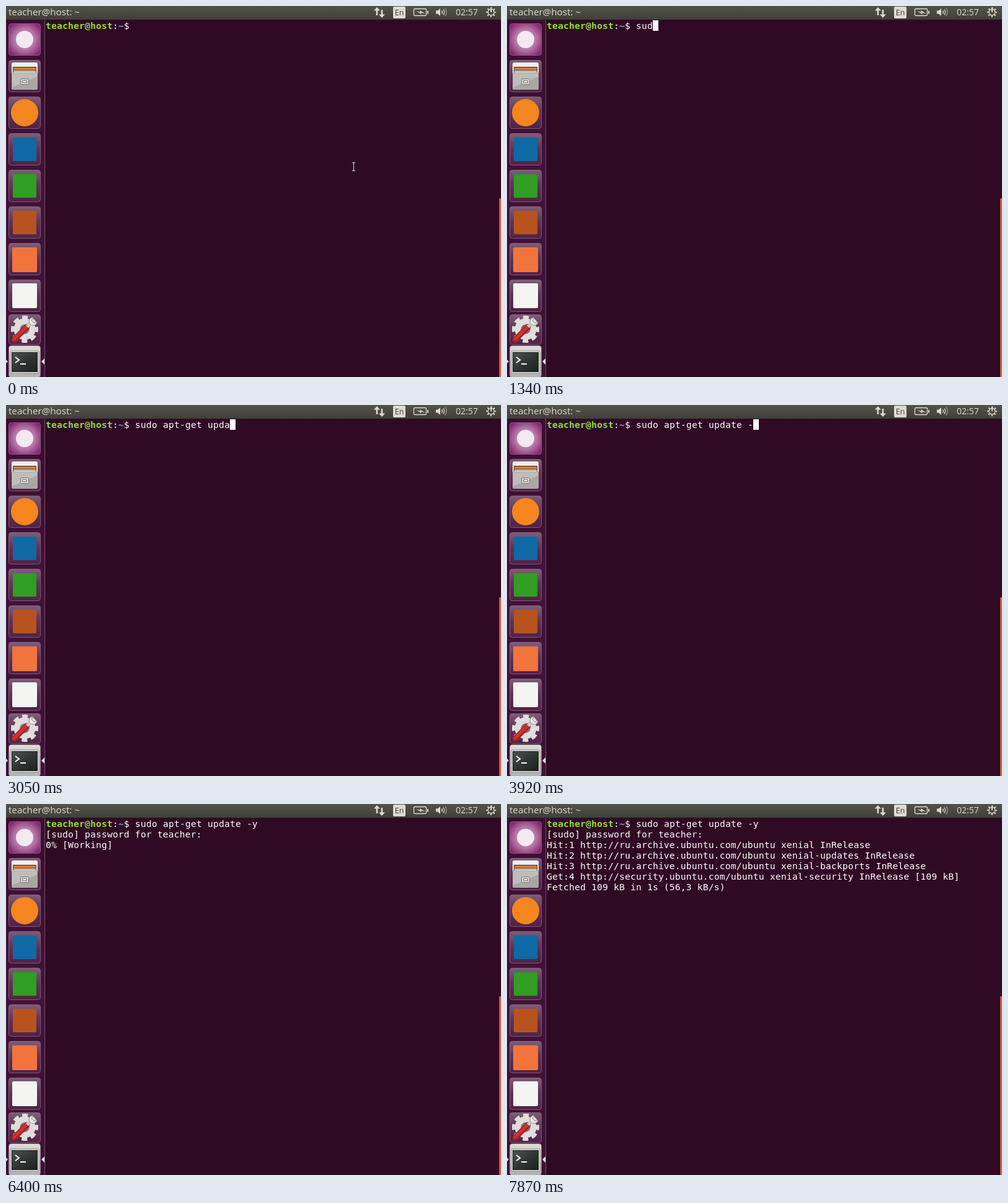
An HTML page that plays this animation: 798 px wide and 598 px high, repeating every 8 s.

```html
<!DOCTYPE html>
<html lang="en">
<head>
<meta charset="utf-8">
<title>Terminal</title>
<style>
  html, body { margin: 0; width: 100%; height: 100%; overflow: hidden; background: #300a24; }
  svg { display: block; width: 100%; height: 100%; }
  text { white-space: pre; }
  .term text { font: 14.667px "DejaVu Sans Mono", monospace; letter-spacing: .17px; fill: #fff; }
  .term .b { font-weight: bold; }
  .bar { font: 500 15.2px "Open Sans", "Noto Sans", sans-serif; fill: #dfdbd2; }
</style>
</head>
<body>
<svg viewBox="0 0 798 598">
  <defs>
    <linearGradient id="panel" x2="0" y2="1">
      <stop stop-color="#53524a"/><stop offset="1" stop-color="#403f3a"/>
    </linearGradient>
    <linearGradient id="dock" x2="0" y2="1">
      <stop stop-color="#3b0d31"/><stop offset=".5" stop-color="#43123a"/><stop offset="1" stop-color="#3f1036"/>
    </linearGradient>
    <linearGradient id="tile" x2="0" y2="1">
      <stop stop-color="#7f5d77"/><stop offset=".45" stop-color="#5e3655"/><stop offset="1" stop-color="#502247"/>
    </linearGradient>
    <radialGradient id="dash" r=".62">
      <stop stop-color="#d3a8c8"/><stop offset=".55" stop-color="#b474a4"/><stop offset="1" stop-color="#84256f"/>
    </radialGradient>
    <linearGradient id="active" x2="0" y2="1">
      <stop stop-color="#dddcd9"/><stop offset="1" stop-color="#b3b1ad"/>
    </linearGradient>
    <linearGradient id="screen" x2="1" y2="1">
      <stop stop-color="#50544f"/><stop offset=".5" stop-color="#313534"/><stop offset="1" stop-color="#1d2020"/>
    </linearGradient>
  </defs>

  <rect width="798" height="598" fill="#300a24"/>
  <rect x="795" y="310" width="3" height="288" fill="#cc5f49"/>

  <rect y="22" width="62" height="576" fill="url(#dock)"/>
  <path d="M62.5 22V598" stroke="#755069"/>
  <g id="tiles"></g>

  <!-- file cabinet -->
  <rect x="9" y="91" width="42" height="20" rx="3" fill="#efeeec"/>
  <path d="M11 98H49V108H11Z" fill="#5c3d28"/>
  <path d="M12 99.500H48V102H12Z" fill="#f3873a"/>
  <path d="M12 103H48V104H12Z" fill="#f6d9b5"/>
  <path d="M12 105H48V108H12Z" fill="#e4e2de"/>
  <rect x="9" y="107" width="42" height="28" rx="2" fill="#a9a7a3"/>
  <path d="M10 108H50V114L10 131Z" fill="#bfbdb9"/>
  <rect x="23.500" y="117.500" width="13" height="9" rx="2" fill="#d8d7d4" stroke="#77756f"/>
  <rect x="26.500" y="120.500" width="7" height="3" fill="#eee" stroke="#77756f"/>

  <!-- settings -->
  <circle cx="30" cy="521" r="19" fill="none" stroke="#dededc" stroke-width="6" stroke-dasharray="9 5.923" stroke-dashoffset="4.500"/>
  <circle cx="30" cy="521" r="12.500" fill="none" stroke="#dededc" stroke-width="10"/>
  <circle cx="30" cy="521" r="7.500" fill="#886880"/>
  <path d="M13 538L34 517" stroke="#a61f1f" stroke-width="9" stroke-linecap="round"/>
  <path d="M13 537L33 517" stroke="#d0332f" stroke-width="5" stroke-linecap="round"/>
  <path d="M34 517L41 510" stroke="#c9c9c7" stroke-width="6"/>
  <path d="M44 502A6.500 6.500 0 1 0 50 509L45 511L41 507Z" fill="#e9e9e7" stroke="#8c8a88"/>

  <!-- terminal launcher -->
  <rect x="7" y="556" width="46" height="36" rx="2" fill="#e6e5e2" stroke="#8a8884"/>
  <rect x="9.500" y="558.500" width="41" height="31" fill="url(#screen)" stroke="#181b1c"/>
  <path d="M15 566L21 570.500L15 575M23 577H32" fill="none" stroke="#fff" stroke-width="2"/>
  <path d="M62 568V578L57 573ZM0 570V576L3 573Z" fill="#e8e2e6"/>

  <!-- panel -->
  <rect width="798" height="22" fill="url(#panel)"/>
  <text class="bar" x="4" y="15">teacher@host: ~</text>
  <g fill="#dfdbd2">
    <path d="M598 2L603 7.500H599.300V15H596.700V7.500H593ZM606 19L601 13.500H604.700V6H607.300V13.500H611Z"/>
    <rect x="624" y="1" width="20" height="19" rx="2"/>
    <path d="M693 7.500H696L700 4V16L696 12.500H693Z"/>
    <path d="M661 8L668 10L667 7L676 12.500L669 10.700L670 13.500Z"/>
  </g>
  <text class="bar" x="634" y="15" text-anchor="middle" style="font-size:12.5px;fill:#3c3b37">En</text>
  <g fill="none" stroke="#dfdbd2" stroke-width="1.300">
    <rect x="657.500" y="4.500" width="20" height="11" rx="1.500"/>
    <path d="M680 8V12.500" stroke-width="2"/>
    <path d="M702.500 7.500Q704.500 10 702.500 12.500M705 5.500Q708 10 705 14.500"/>
    <path d="M708 3.500Q712 10 708 16.500" stroke-opacity=".55"/>
    <circle cx="782" cy="10" r="5"/>
    <circle cx="782" cy="10" r="6.700" stroke-width="2.600" stroke-dasharray="2 3.262" stroke-dashoffset="1"/>
    <path d="M782 4V10" stroke-width="2"/>
  </g>
  <text class="bar" x="725" y="15" style="font-size:14px">02:57</text>

  <g class="term">
    <text class="b" x="64" y="37" style="fill:#8ae234">teacher@host</text>
    <text x="172" y="37">:</text>
    <text class="b" x="181" y="37" style="fill:#729fcf">~</text>
    <text x="190" y="37">$</text>
    <g id="rows"></g>
    <rect id="caret" width="9" height="17" fill="#fff"/>
  </g>
  <path id="mouse" d="M-2.500 -6.500H2.500M0 -6.500V6.500M-2.500 6.500H2.500" fill="none" stroke="#e4e0e3"/>
</svg>
<script>
const $ = id => document.getElementById(id);
const LOOP = 8000, CELL = 9, LINE = 17, LEFT = 64, TOP = 23, PROMPT = 16;

const tile = (y, fill = 'url(#tile)', h = 51) =>
  `<rect x="4.5" y="${y + .5}" width="51" height="${h}" rx="4" fill="${fill}" stroke="#8d7086" stroke-opacity=".75"/>`;
const square = (x, y, w, fill) => `<rect x="${x}" y="${y}" width="${w}" height="${w}" rx="2" fill="${fill}"/>`;
const disc = (y, r, fill) => `<circle cx="30" cy="${y}" r="${r}" fill="${fill}"/>`;

$('tiles').innerHTML =
  tile(28, 'url(#dash)') + disc(54, 14, '#f3e9f0') +
  tile(87) +
  tile(146) + disc(172, 22, '#f5851f') +
  tile(205) + square(11, 212, 38, '#0f69a5') +
  tile(264) + square(11, 271, 38, '#2f9e22') +
  tile(323) + square(11, 330, 38, '#b8531f') +
  tile(382) + square(10, 389, 40, '#f1743c') +
  tile(441) + square(10, 447, 40, '#f4f4f3') +
  tile(497, undefined, 48) +
  tile(547, 'url(#active)');

const command = 'sudo apt-get update -y';
const keys = [350, 560, 770, 1490, 1620, 1750, 1880, 2000, 2130, 2360, 2440,
  2540, 2640, 2740, 2840, 2950, 3050, 3200, 3290, 3690, 3820, 3950];
const caretOff = [[0, 70], [880, 1340], [4690, 4760], [6400, 7000], [7640, LOOP]];

const repo = 'http://ru.archive.ubuntu.com/ubuntu xenial';
const ask = '[sudo] password for teacher: ';
const hits = ['', '-updates', '-backports'].map((s, i) => `Hit:${i + 1} ${repo}${s} InRelease`);
const get = 'Get:4 http://security.ubuntu.com/ubuntu xenial-security InRelease [109 kB]';
const busy = '0% [Working]';
const output = [
  [0, []],
  [4070, [ask]],
  [5770, [ask, '']],
  [5920, [ask, busy]],
  [6550, [ask, hits[0], busy]],
  [6700, [ask, ...hits, busy]],
  [7170, [ask, ...hits, get, busy]],
  [7330, [ask, ...hits, get, '100% [Working]']],
  [7870, [ask, ...hits, get, 'Fetched 109 kB in 1s (56,3 kB/s)']]
];

const startX = row => LEFT + (row ? 0 : PROMPT * CELL);
$('rows').innerHTML = Array.from({ length: 7 }, (_, i) =>
  `<text x="${startX(i)}" y="${TOP + 14 + i * LINE}"></text>`).join('');
const rows = [...$('rows').children];

function draw(t) {
  const typed = command.slice(0, keys.filter(k => k <= t).length);
  const lines = [typed, ...output.findLast(([at]) => at <= t)[1]];
  rows.forEach((el, i) => {
    const s = lines[i] || '';
    if (el.textContent !== s) el.textContent = s;
  });

  const last = lines.length - 1;
  const caret = $('caret');
  caret.setAttribute('x', startX(last) + lines[last].length * CELL);
  caret.setAttribute('y', TOP + last * LINE);
  caret.style.display = caretOff.some(([a, b]) => t >= a && t < b) ? 'none' : '';

  // The pointer is nudged once, then hides at the first key.
  const mouse = $('mouse');
  mouse.setAttribute('transform', t < 70 ? 'translate(560.5 259)' : 'translate(567.5 263)');
  mouse.style.display = t < keys[0] ? '' : 'none';
}

const start = performance.now();
function tick() {
  draw((performance.now() - start) % LOOP);
  requestAnimationFrame(tick);
}
tick();
</script>
</body>
</html>
```
